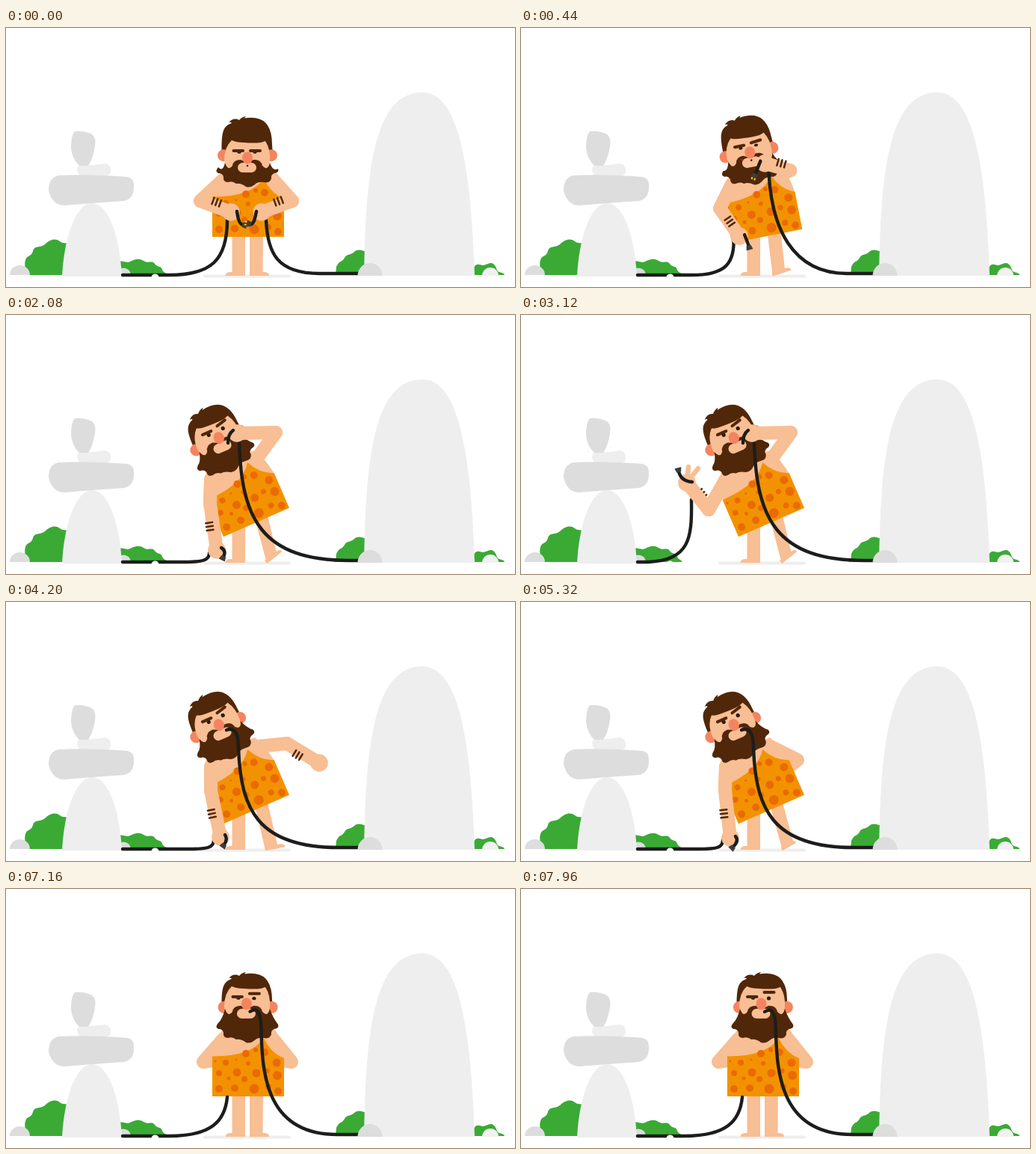
Write an HTML page that moves like this. It is 681 by 346 pixels and loops after 8 s.

```html
<!DOCTYPE html>
<html lang="en">
<head>
<meta charset="utf-8">
<title>Unplugged caveman</title>
<style>
html, body { margin: 0; width: 100%; height: 100%; overflow: hidden; background: #fff; }
svg { display: block; width: 100vw; height: 100vh; }
.skin { fill: #f8be94; }
.arm { fill: none; stroke: #f8be94; stroke-width: 18; stroke-linecap: round; stroke-linejoin: round; }
.hair { fill: #512709; }
.green { fill: #3aaa35; }
.light { fill: #eee; }
.grey { fill: #ddd; }
.cable { fill: none; stroke: #1d1d1b; stroke-width: 4.4; stroke-linecap: round; }
.brow { stroke: #512709; stroke-width: 4; stroke-linecap: round; }
.band { fill: none; stroke: #512709; stroke-width: 2.5; stroke-linecap: round; }
.finger { fill: none; stroke: #f8be94; stroke-width: 6.5; stroke-linecap: round; }
.ear { fill: #f4845f; }
</style>
</head>
<body>
<svg viewBox="0 0 681 346" preserveAspectRatio="none">
  <path class="green" d="M25 330C27 322 24 316 26 310C28 303 34 306 36 298C38 290 46 294 52 289C58 283 66 280 72 285C78 290 84 284 90 292V330Z"/>
  <path class="green" d="M150 330V313C156 309 160 315 166 312C172 309 178 307 184 311C190 315 196 310 199 315C202 320 208 317 209 323C210 327 216 327 215 330Z"/>
  <path class="green" d="M438 330C444 326 440 321 443 317C447 310 450 313 453 307C456 301 461 304 466 299C472 294 476 298 484 299V330Z"/>
  <path class="green" d="M626 330V320C630 313 634 317 638 317C643 317 648 311 653 316C657 320 656 325 660 326C664 327 667 328 667 330Z"/>
  <path class="grey" d="M5 330A13.5 13 0 0 1 32 330Z"/>
  <path class="grey" d="M147 330A10 9.500 0 0 1 167 330Z"/>
  <path class="light" d="M97 184Q115 184 133 181Q141 183 140 192Q140 197 132 198H100Q92 190 97 184Z"/>
  <path class="grey" d="M92 138Q104 137 115 142Q121 147 119 158Q116 176 110 184H98Q88 174 87 160Q87 144 92 138Z"/>
  <path class="grey" d="M70 197Q110 195 163 199Q172 201 171 213Q171 228 158 231Q115 234 78 237Q62 237 57 217Q57 200 70 197Z"/>
  <path class="light" d="M75 332C78 275 95 234 115 234C136 234 152 275 155 332Z"/>
  <path class="light" d="M479 331C481 200 490 86 557 86C607 86 622 190 627 331Z"/>
  <path d="M637 331A11 11 0 0 1 659 331Z" fill="#f1f1f1"/>
  <rect class="light" x="264" y="329.500" width="117" height="4" rx="2"/>

  <g id="backArms"><path class="arm" id="backL"/><path class="arm" id="backR"/></g>
  <path class="skin" d="M302.500 265H320V331H293.500Q294 326 300 326H302.500Z"/>
  <path class="skin" id="legR"/>
  <path class="skin" id="footR"/>
  <g id="body">
    <path class="skin" d="M290 188H360Q368 200 372 228H276Q280 200 290 188Z"/>
    <path fill="#f39200" d="M276 277V223.500Q328 224 345 199Q354 219 372 226V277Z"/>
    <g id="spots" fill="#ea6a05"></g>
  </g>
  <path class="arm" id="upperL"/>
  <g id="head">
    <path class="hair" d="M288.500 156C288.500 130 291 124 302 120Q301 118 298 119Q305 112 312 116Q315 112 321 111L319 113.500Q352 108 355.500 140L356.500 156Z"/>
    <g id="ears"><circle class="ear" cx="291" cy="158" r="8"/><circle class="ear" cx="355" cy="158" r="8"/></g>
    <path class="skin" id="skull"/>
    <path class="hair" id="beard"/>
    <g id="face">
      <ellipse id="eyeL" cx="312" rx="2.600" fill="#2a1a10"/>
      <ellipse id="eyeR" cx="333" rx="2.600" fill="#2a1a10"/>
      <path class="brow" id="browL" d="M304.500 144H317"/>
      <path class="brow" id="browR" d="M327 144H340"/>
      <rect class="skin" x="310" y="160" width="25" height="13" rx="6.500"/>
      <circle id="dot" cx="323" cy="164" r="1.300" fill="#2a1a10"/>
      <ellipse id="roar" cx="311" cy="161" fill="#e30613"/>
      <ellipse cx="323" cy="153.500" rx="7" ry="8" fill="#f4845f"/>
    </g>
  </g>
  <path class="cable" id="cordL"/>
  <path class="cable" id="cordR"/>
  <path fill="#fff" d="M194.500 333A5 4.500 0 0 1 204.500 333Z"/>
  <path class="grey" d="M470.500 331A16.500 17 0 0 1 503.500 331Z"/>
  <g id="frontL">
    <path class="arm" id="foreL"/>
    <path class="finger" id="fingers" d="M0 0L2 -21M3 -4L15 -19"/>
    <circle class="skin" id="handL" r="11.800"/>
    <path class="band" id="bandL" d="M-5 -4.500V4.500M0 -4.500V4.500M5 -4.500V4.500"/>
  </g>
  <g id="frontR">
    <path class="arm" id="foreR"/>
    <circle class="skin" id="handR" r="11.800"/>
    <path class="band" id="bandR" d="M-5 -4.500V4.500M0 -4.500V4.500M5 -4.500V4.500"/>
  </g>
  <path class="cable" id="tailL"/>
  <path class="cable" id="tailR"/>
  <path id="plugL" fill="#3c3c3b" d="M-3 -1H3L4.500 5H-4.500Z"/>
  <g id="plugR">
    <path d="M-2 5V8M2 5V8" stroke="#ffd500" stroke-width="2"/>
    <path fill="#3c3c3b" d="M-3 -1H3L4.500 5H-4.500Z"/>
  </g>
</svg>
<script>
const LOOP = 8000, TILT = -23.5, HIP = [324, 277];
const el = {};
document.querySelectorAll('[id]').forEach(n => el[n.id] = n);

const set = (id, attrs) => { for (const k in attrs) el[id].setAttribute(k, attrs[k]); };
const show = (id, on) => { el[id].style.display = on ? '' : 'none'; };

const spots = [
  [294, 232, 4], [308, 228, 1.5], [321, 220, 5], [334, 215, 3], [346, 218, 5],
  [324, 233, 3], [362, 232, 5.5], [285, 246, 4], [309, 245, 5.5], [298, 253, 2.5],
  [319, 254, 4], [335, 246, 5.5], [349, 243, 3.5], [363, 249, 6], [285, 267, 5],
  [306, 266, 5], [332, 267, 6.5], [351, 264, 4], [364, 270, 5], [280, 230, 1.6]
];
el.spots.innerHTML = spots.map(([x, y, r]) => `<circle cx="${x}" cy="${y}" r="${r}"/>`).join('');

// Arms: elbow x, y, hand x, y. Tails: tip, control, end. Cords: start or run, then controls and end.
const front = {
  bend: 0, bodyY: 2, headX: 0, headY: 5, look: 13, faceX: 0,
  eyes: [.45, .45], brow: [0, 0, 0], roar: 0, dot: 1,
  armL: [260, 231, 301, 246], armR: [383, 231, 342, 246],
  foreL: 1, foreR: 1, fingers: 0, bandL: [6, 1], bandR: 1,
  cordL: [218, 275, 330, 296, 310, 296, 256],
  cordR: [348, 257, 350, 300, 362, 328, 420, 328],
  tailL: [317, 263, 311, 262, 309, 245], tailR: [327, 262, 332, 263, 335, 245],
  plugL: 1, plugR: 1, leg: [335, 326, 331], foot: [0, 26]
};
const raise = {
  ...front, bend: 1, bodyY: 0, headX: -1.5, headY: -3, look: 3, faceX: 1.5,
  eyes: [1, 1], brow: [-3, -14, -7.5], roar: 1, dot: 0,
  armL: [273, 252, 282, 314], armR: [335, 145, 309, 108], bandL: [-5, 1], bandR: 0,
  cordL: [240, 262, 330, 272, 328, 272, 318],
  cordR: [313, 120, 318, 225, 361, 328, 455, 328],
  tailL: [291, 323, 295, 315, 288, 311], tailR: [298, 121, 298, 106, 304, 103],
  leg: [341, 349, 332], foot: [-38, 26]
};
const bite = {
  ...raise, roar: 0, armR: [361, 157, 309, 158],
  cordR: [312, 170, 315, 270, 340, 328, 460, 328],
  tailR: [297, 171, 297, 159, 304, 154], plugR: 0
};
const raised = {
  ...bite, armL: [251, 260, 222, 224], fingers: 1, bandL: [-10, .25],
  cordL: [170, 225, 327, 229, 300, 228, 247],
  tailL: [211, 209, 214, 222, 229, 223]
};
const inMouth = {
  cordR: [311, 195, 314, 275, 335, 328, 445, 328],
  tailR: [295, 171, 311, 165, 311, 195]
};
const swing = {
  ...bite, ...inMouth, armL: [274, 252, 287, 314], armR: [383, 165, 430, 114], bandR: 1,
  cordL: [245, 270, 330, 278, 328, 278, 318],
  tailL: [292, 324, 297, 317, 293, 311], foot: [-20, 26]
};
const fling = { ...swing, armR: [385, 174, 441, 160] };
const out = { ...swing, armR: [376, 189, 419, 215], leg: [341, 347, 332], foot: [-10, 27] };
const hip = {
  ...out, armL: [273, 252, 280, 315], armR: [370, 211, 340, 235], foreR: 0,
  cordL: [240, 262, 330, 270, 328, 270, 318],
  tailL: [284, 327, 292, 319, 287, 313], leg: [341, 350, 332], foot: [-30, 21]
};
const stand = {
  ...front, bodyY: 0, headY: 0, look: 0, dot: 0, foreL: 0, foreR: 0, plugL: 0, plugR: 0,
  armL: [264, 231, 300, 225], armR: [382, 231, 345, 225],
  cordL: [218, 275, 330, 293, 310, 296, 278],
  cordR: [343, 190, 344, 250, 350, 328, 443, 328],
  tailR: [328, 163, 343, 153, 343, 190]
};
const wink = {
  ...stand, faceX: -1.5, eyes: [.45, 1], brow: [0, 0, -6],
  cordR: [341, 190, 342, 250, 350, 328, 443, 328],
  tailR: [326, 164, 341, 154, 341, 190]
};

const timeline = [
  [0, front], [200, front], [700, raise], [1400, raise], [2000, bite], [2560, bite],
  [2950, raised], [3400, raised], [3700, swing], [3900, fling], [4200, out],
  [4700, hip], [5700, hip], [6200, stand], [6900, stand], [7300, wink], [LOOP, wink]
];

const mix = (a, b, k) => Array.isArray(a) ? a.map((v, i) => mix(v, b[i], k)) : a + (b - a) * k;

function poseAt(t) {
  let i = 1;
  while (timeline[i][0] < t) i++;
  const [t0, a] = timeline[i - 1], [t1, b] = timeline[i];
  let k = Math.max(0, (t - t0) / (t1 - t0));
  k = k * k * (3 - 2 * k);
  const pose = {};
  for (const key in a) pose[key] = mix(a[key], b[key], k);
  return pose;
}

function onBody(x, y, p) {
  const a = TILT * p.bend * Math.PI / 180, dx = x - HIP[0], dy = y - HIP[1];
  return [
    HIP[0] + 11 * p.bend + dx * Math.cos(a) - dy * Math.sin(a),
    HIP[1] + p.bodyY + dx * Math.sin(a) + dy * Math.cos(a)
  ];
}

function drawArm(side, shoulder, p) {
  const [ex, ey, hx, hy] = p['arm' + side], inFront = p['fore' + side] > .5;
  const upper = `M${shoulder}L${ex},${ey}`;
  set('back' + side, { d: inFront ? upper : `${upper}L${hx},${hy}` });
  set('fore' + side, { d: `M${ex},${ey}L${hx},${hy}` });
  set('hand' + side, { cx: hx, cy: hy });
  show('front' + side, inFront);

  const dx = hx - ex, dy = hy - ey, len = Math.hypot(dx, dy) || 1;
  const left = side === 'L', [off, size] = left ? p.bandL : [-6, 1], f = left ? .48 : .4;
  const x = ex + dx * f + dy / len * -Math.abs(0) + dy / len * off, y = ey + dy * f - dx / len * off;
  set('band' + side, {
    transform: `translate(${x} ${y}) rotate(${Math.atan2(dy, dx) * 180 / Math.PI}) scale(1 ${size})`
  });
  return upper;
}

function drawTail(side, p) {
  const [x, y, kx, ky, ex, ey] = p['tail' + side];
  const turn = Math.atan2(y - ky, x - kx) * 180 / Math.PI - 90;
  set('tail' + side, { d: `M${ex},${ey}Q${kx},${ky} ${x},${y}` });
  set('plug' + side, { transform: `translate(${x} ${y}) rotate(${turn})` });
  show('plug' + side, p['plug' + side] > .5);
}

function drawHead(p) {
  const d = p.look, Y = y => y + d;
  set('ears', { transform: `translate(${p.faceX * -.6} ${d * .4})` });
  set('skull', { d: `M292 ${Y(157)}Q292 ${Y(139)} 302 ${Y(130)}Q308 ${Y(133)} 318 ${Y(133)}Q332 ${Y(134)} 341 ${Y(133)}L347 ${Y(131)}Q354 ${Y(142)} 353 ${Y(157)}L350 185H296Z` });
  set('beard', { d: `M293 ${Y(160)}Q297 ${Y(172)} 303 ${Y(164)}Q304 ${Y(156)} 314 ${Y(156)}L323 ${Y(160)}L331 ${Y(156)}Q341 ${Y(155)} 343 ${Y(164)}Q350 ${Y(172)} 353 ${Y(160)}Q357 ${Y(172)} 364 181Q366 186 359 187Q354 189 355 194Q353 201 345 199Q337 198 333 202Q327 207 321 205Q314 200 308 201Q303 197 297 199Q290 199 291 192Q290 187 284 187Q279 184 284 179Q290 ${Y(173)} 293 ${Y(160)}Z` });
  set('face', { transform: `translate(${p.faceX} ${d})` });
  set('eyeL', { cy: 146 - p.bend * 1.5 + (1 - p.eyes[0]), ry: 2.6 * p.eyes[0] });
  set('eyeR', { cy: 146 - p.bend * 2 + (1 - p.eyes[1]), ry: 2.6 * p.eyes[1] });
  set('browL', { transform: `translate(0 ${p.brow[0]})` });
  set('browR', { transform: `translate(0 ${p.brow[2]}) rotate(${p.brow[1]} 333 144)` });
  set('roar', { rx: 4 * p.roar, ry: 2.6 * p.roar });
  show('dot', p.dot > .5);
}

function drawLeg(p) {
  const [hx, x, y] = p.leg, [turn, len] = p.foot, a = turn * Math.PI / 180;
  set('legR', { d: `M${hx - 9},268H${hx + 9}L${x + 17.5 * Math.cos(a)},${y + 17.5 * Math.sin(a)}L${x},${y}Z` });
  set('footR', {
    d: `M0 0V-5H${len - 7}Q${len} -5 ${len} 0Z`,
    transform: `translate(${x} ${y}) rotate(${turn})`
  });
}

function draw(t) {
  const p = poseAt(t);
  const lean = `translate(${11 * p.bend} ${p.bodyY}) rotate(${TILT * p.bend} ${HIP})`;
  set('body', { transform: lean });
  set('head', { transform: `${lean} translate(${p.headX} ${p.headY})` });
  drawHead(p);
  drawLeg(p);

  set('upperL', { d: drawArm('L', onBody(291, 200, p), p) });
  show('upperL', p.bend > .4);
  drawArm('R', onBody(357, 200, p), p);
  show('bandR', p.bandR > .5);
  set('fingers', { transform: `translate(${p.armL[2]} ${p.armL[3]}) scale(${p.fingers})` });

  const [run, ...l] = p.cordL, [x, y, ...r] = p.cordR;
  set('cordL', { d: `M156,330H${run}C${l}` });
  set('cordR', { d: `M${x},${y}C${r}H474` });
  drawTail('L', p);
  drawTail('R', p);
  show('tailL', p.plugL > .5);
}

const start = performance.now();
function tick(now) {
  draw(Math.max(0, now - start) % LOOP);
  requestAnimationFrame(tick);
}
draw(0);
requestAnimationFrame(tick);
</script>
</body>
</html>
```
